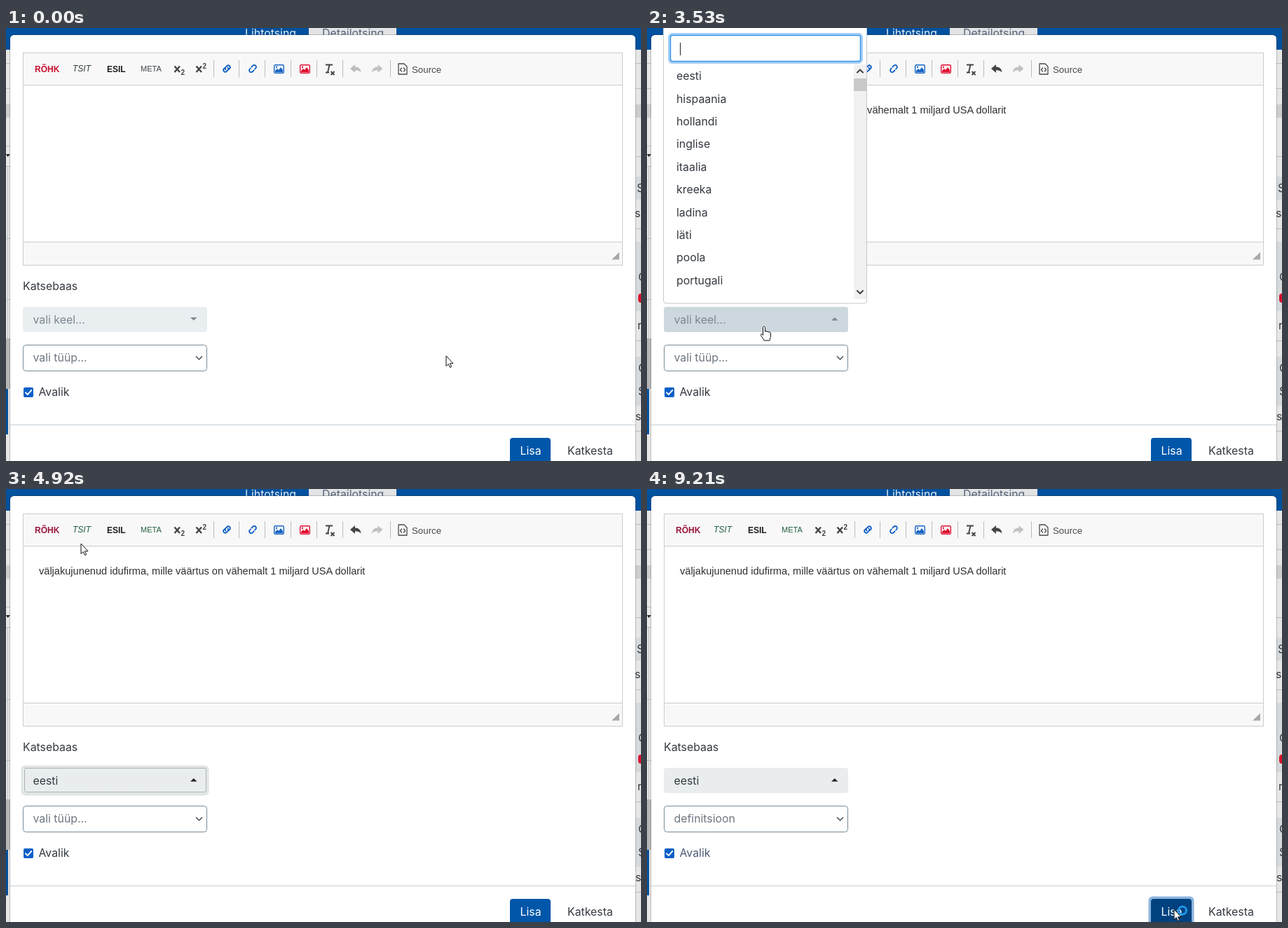
An HTML page that plays this animation: 906x618 px, repeating every 9.28 s.

```html
<!DOCTYPE html>
<html lang="et">
<head>
<meta charset="utf-8">
<title>Definitsiooni lisamine</title>
<style>
  html, body { margin: 0; width: 100%; height: 100%; overflow: hidden; background: #fff; }
  svg { display: block; width: 906px; height: 618px; }
  text { font: 15.85px Inter, sans-serif; fill: #343a41; white-space: pre; }
  .arial text, text.arial { font-family: "Liberation Sans", Arial, sans-serif; }
  .native text { font: 14.6px "Open Sans", "Noto Sans", sans-serif; fill: #5b6070; }
  .tool text { font-size: 12px; }
  .line { fill: none; stroke-linecap: round; stroke-linejoin: round; }
</style>
</head>
<body>
<svg viewBox="0 0 906 618">
  <defs>
    <g id="picture">
      <rect x=".7" y=".7" width="13.6" height="11.6" rx="1.5" fill="#fff" stroke="currentColor" stroke-width="1.4"/>
      <path d="M2 11V9l3-3 2 2 3-4 3 4v3z" fill="currentColor"/>
      <circle cx="4" cy="3.7" r="1.2" fill="currentColor"/>
    </g>
    <path id="back" d="M0 6 7 0v3.5c5 0 8 2.5 8.5 8C13.5 9 11 8.300 7 8.300V12z"/>
    <path id="chain" class="line" stroke="#0b5cc4" stroke-width="1.8"
      d="M-1.5 1.5a2.6 2.6 0 0 1 0-3.600l1.800-1.800a2.6 2.6 0 0 1 3.700 3.700l-1.300 1.300M1.5-1.5a2.6 2.6 0 0 1 0 3.600l-1.800 1.800a2.6 2.6 0 0 1-3.700-3.700l1.300-1.300"/>
    <path id="halfLink" class="line" stroke="#0b5cc4" stroke-width="1.8" d="M-1.5-2.5l1.800-1.800a2.6 2.6 0 0 1 3.900 3.700l-1 1.100"/>
  </defs>

  <!-- dimmed page behind the dialog -->
  <g id="page">
    <rect width="906" height="618" fill="#e6e6e6"/>
    <rect width="906" height="31" fill="#00519e"/>
    <rect x="432" width="125" height="12" fill="#e2e3e5"/>
    <text x="341" y="13" style="fill:#e6eef6">Lihtotsing</text>
    <text x="451" y="13" style="fill:#56657b">Detailotsing</text>
    <rect y="109" width="906" height="19" fill="#cdcdcd"/>
    <path d="M0 50.500H906M0 86.500H906M896 183.500h10M896 286.500h10M896 446.500h10M896 575.500h10M0 168.500h6M0 197.500h6M0 300.500h6M0 387.500h6" stroke="#b9bcc0"/>
    <path d="M896 212h10v33h-10zM896 305h10v33h-10zM896 338h10v66h-10zM896 469h10v70h-10z" fill="#d6d9db"/>
    <path d="M2.500 198V515" stroke="#b9bcc0"/>
    <rect y="443" width="6" height="72" fill="#b5b5b5"/>
    <rect y="515" width="3" height="65" fill="#00519e"/>
    <path d="M0 180h6l-3.500 4z" fill="#222"/>
    <rect x="902" y="379" width="10" height="13" rx="4" fill="#d9132f"/>
    <g id="snippets"></g>
  </g>

  <!-- dialog -->
  <rect x="5.500" y="9.500" width="893" height="640" rx="6" fill="none" stroke="#000" stroke-opacity=".2"/>
  <rect x="6" y="10" width="892" height="640" rx="5.500" fill="#fff"/>
  <path d="M6 566.500H898" stroke="#c5d0d9"/>
  <g stroke="#c9cccf">
    <rect x="24.500" y="35.500" width="855" height="303" fill="#fff"/>
    <path d="M24.500 35.500h855v46h-855zM24.500 305.500h855v33h-855z" fill="#f8f8f8"/>
  </g>
  <path d="M875 320v10.500h-11z" fill="#a8a8a8"/>
  <path d="M296.500 46v24M332.500 46v24M369.500 46v24M406.500 46v24M443.500 46v24M480.500 46v24M548.500 46v24" stroke="#bcbcbc"/>

  <g class="arial tool">
    <text id="rohk" x="41" y="63" style="font-weight:bold">RÕHK</text>
    <text id="tsit" x="95" y="62" style="font-style:italic">TSIT</text>
    <text x="144" y="63" style="font-weight:bold;fill:#1c1c1c">ESIL</text>
    <text id="meta" x="192" y="62" style="font-size:11px">META</text>
    <path d="M240.500 54.500l7.500 8.500M248 54.500l-7.500 8.500M271.500 54.500l7.500 8.500M279 54.500l-7.500 8.500" stroke="#444" stroke-width="2.400"/>
    <text x="249.500" y="67" style="font-size:10px;fill:#444;font-weight:bold">2</text>
    <text x="280.500" y="58" style="font-size:10px;fill:#444;font-weight:bold">2</text>
    <text x="579" y="63.500" style="font-size:13.300px;fill:#484848">Source</text>
  </g>
  <use href="#chain" x="315" y="58"/>
  <use href="#halfLink" x="352" y="58"/>
  <use href="#halfLink" transform="translate(352 58) rotate(180)"/>
  <use href="#picture" x="382" y="52" color="#1763c2"/>
  <use href="#picture" x="419" y="52" color="#df0d2f"/>
  <path d="M456 52.500h10M461.500 52.500l-2.500 11M456 63.500h5M463.500 62l5 5M468.500 62l-5 5" fill="none" stroke="#444" stroke-width="1.900"/>
  <use id="undo" href="#back" x="491" y="52"/>
  <use href="#back" transform="translate(537.500 52) scale(-1 1)" fill="#c2c2c2"/>
  <path class="line" d="M560 51h8l4 4v11h-12zM564.500 57l-2 2.500 2 2.500M567.500 57l2 2.500-2 2.500" stroke="#4a4a4a" stroke-width="1.300"/>

  <text id="definition" class="arial" x="47" y="121.500" style="font-size:14.570px;fill:#2f2f2f">väljakujunenud idufirma, mille väärtus on vähemalt 1 miljard USA dollarit</text>
  <path id="caret" d="M0 108.500v15.500" stroke="#111"/>

  <!-- form -->
  <text x="24" y="373.500">Katsebaas</text>
  <rect id="languageRing" x="21.500" y="394.500" width="268" height="43" rx="6" fill="#e1e4e5"/>
  <rect id="languageBox" x="24" y="398" width="263" height="36" rx="4"/>
  <rect id="languageDots" x="26.500" y="398.500" width="259" height="34" rx="2" fill="none" stroke="#6d7276" stroke-dasharray="1 1"/>
  <text id="languageText" x="38.500" y="421.500"></text>
  <path id="languageArrow"/>

  <rect id="typeRing" x="20.500" y="448.500" width="270" height="45" rx="7" fill="#a8d0f5"/>
  <rect id="typeBox" x="24.500" y="452.500" width="262" height="37" rx="4" fill="#fff"/>
  <text id="typeText" x="38.500" y="476"></text>
  <path class="line" d="M271.500 469l4 4 4-4" stroke="#4d5660" stroke-width="1.700"/>

  <rect x="25" y="513" width="14" height="14" rx="2" fill="#0b60c8"/>
  <path class="line" d="M28 520.300l2.800 2.900 5.500-6.200" stroke="#fff" stroke-width="1.900"/>
  <text id="public" x="46.500" y="524.500">Avalik</text>

  <rect id="addRing" x="715.500" y="581.500" width="65" height="46" rx="6" fill="#8db4dc"/>
  <rect id="addBox" x="719" y="585" width="58" height="40" rx="4"/>
  <text x="748.500" y="609" text-anchor="middle" style="fill:#fff">Lisa</text>
  <text x="801" y="609">Katkesta</text>

  <g id="languageMenu">
    <rect x="23.500" y="-8" width="290" height="401" rx="4" fill="#fff" stroke="#c3cad0"/>
    <rect x="30" y="7" width="278" height="44" rx="6" fill="#a8d0f5"/>
    <rect x="33.500" y="10.500" width="271" height="37" rx="3" fill="#fff" stroke="#3a97ea" stroke-width="1.500"/>
    <path id="searchCaret" d="M47.500 21v18" stroke="#222"/>
    <rect id="languageHover" x="24" width="271" height="32.400" fill="#e9edf1"/>
    <g id="languages"></g>
    <path d="M295 52h18v335h-18z" fill="#f1f1f1"/>
    <path d="M295 72h18v18h-18z" fill="#c9c9c9"/>
    <path class="line" d="M300 63.500l4-4 4 4M300 375l4 4 4-4" stroke="#444" stroke-width="2"/>
  </g>

  <g id="typeMenu" class="native">
    <rect x="23.500" y="489.500" width="262" height="140" fill="#fff" stroke="#8e98a2"/>
    <rect id="typeHover" x="24" width="261" height="31" fill="#dfdfe4"/>
    <g id="types"></g>
  </g>

  <g id="pointer">
    <path id="arrow" d="M0 0v14.500l3.300-3 2.200 5 2.200-1-2.200-4.700h4.500z" fill="#fff" stroke="#111"/>
    <path id="beam" d="M-3.500-7.500h2.500L0-6.500 1-7.500h2.500M0-6.500v13M-3.500 7.500H-1L0 6.500l1 1h2.500" fill="none" stroke="#111" stroke-width="1.200"/>
    <path id="hand" d="M-1.500 1.500c0-2 3-2 3 0v6c.5-1.500 3-1.200 3 .5.500-1.300 2.700-1 2.700.6.500-1 2.300-.6 2.300 1V14c0 2-1.300 3-1.500 6H0c-.5-2.500-3-4-4.500-7.500-.8-2 1-2.500 2-1.200l1 1.300z" fill="#fff" stroke="#111"/>
    <circle id="busy" cx="12" cy="1.500" r="5.500" fill="none" stroke="#2196e8" stroke-width="3"/>
  </g>
</svg>

<script>
const LOOP = 9280;
const $ = id => document.getElementById(id);
const show = (id, visible) => $(id).setAttribute('display', visible ? 'inline' : 'none');
const set = (id, attrs) => { for (const name in attrs) $(id).setAttribute(name, attrs[name]); };
const within = (t, from, to) => t >= from && t < to;

// items: [label, baseline, left]
function addTexts(id, items) {
  $(id).innerHTML = items.map(([label, y, x]) => `<text x="${x}" y="${y}">${label}</text>`).join('');
}
const ROW = 32.4;
addTexts('languages', ['eesti', 'hispaania', 'hollandi', 'inglise', 'itaalia', 'kreeka', 'ladina', 'läti', 'poola', 'portugali']
  .map((label, i) => [label, 74.2 + i * ROW, 42]));
addTexts('types', ['–', 'definitsioon', 'selgitus', 'lühivihje (kakskeelses)']
  .map((label, i) => [label, 515.5 + i * 31, 31]));
addTexts('snippets', [['S', 234, 900], ['su', 270, 897], ['O', 361, 902], ['r', 430, 901], ['O', 491, 902], ['S', 524, 902], ['s', 560, 898]]);

// pointer hot spot: time, x, y
const PATH = [
  [0, 628, 468], [69, 628, 468], [70, 574, 380], [340, 574, 380], [540, 373, 214], [2649, 373, 214],
  [2650, 254, 327], [2920, 167, 426], [3790, 167, 426], [4000, 137, 138], [4240, 122, 108], [4650, 107, 78],
  [5120, 107, 78], [5320, 187, 290], [5520, 156, 487], [5719, 156, 487], [5720, 155, 480],
  [6470, 155, 480], [6680, 148, 522], [6900, 148, 540], [7610, 148, 540], [7880, 741, 457],
  [8140, 741, 457], [8270, 752, 586], [8460, 752, 600], [LOOP, 752, 600]
];
function pointerAt(t) {
  const i = PATH.findIndex(p => p[0] > t);
  const [t0, x0, y0] = PATH[i - 1], [t1, x1, y1] = PATH[i];
  const k = (t - t0) / (t1 - t0);
  return [x0 + (x1 - x0) * k, y0 + (y1 - y0) * k];
}

function pointerShape(t) {
  if (within(t, 410, 2700) || within(t, 5150, 5330)) return 'beam';
  return within(t, 2880, 4920) ? 'hand' : 'arrow';
}

function drawEditor(t) {
  const typed = t >= 1990, chosen = t >= 4920;
  show('definition', typed);
  show('caret', within(t, 1000, 1590) || within(t, 1990, 2720) || within(t, 3180, 3250));
  set('caret', { transform: `translate(${typed ? 512.5 : 47.5} 0)` });
  set('undo', { fill: t >= 2120 ? '#454545' : '#bdbdbd' });
  $('rohk').style.fill = chosen ? '#98173a' : '#c8102e';
  $('tsit').style.fill = chosen ? '#22603f' : '#33423d';
  $('meta').style.fill = chosen ? '#22603f' : '#3b444c';
}

function drawLanguage(t) {
  const open = within(t, 3530, 4920), chosen = t >= 4920;
  const pressed = within(t, 3180, 4920), focused = within(t, 4920, 5940);
  show('languageRing', focused || within(t, 3180, 3530));
  show('languageDots', focused);
  set('languageBox', { fill: pressed ? '#cdd7de' : chosen ? '#e9edee' : '#e9eef1' });
  $('languageText').textContent = chosen ? 'eesti' : 'vali keel...';
  $('languageText').style.fill = chosen ? '#343a41' : '#7d878f';
  set('languageArrow', {
    d: open || chosen ? 'M263 417.500h9.500l-4.750-4.500z' : 'M263 413h9.500l-4.750 4.500z',
    fill: chosen ? '#222' : '#7d878f'
  });
  show('languageMenu', open);
  show('searchCaret', (t - 3530) % 1060 < 530);
  const row = Math.floor((pointerAt(Math.max(0, t - 30))[1] - 52.8) / ROW);
  show('languageHover', open && row >= 0 && row < 10);
  set('languageHover', { y: 52.8 + row * ROW });
}

function drawType(t, y) {
  const focused = within(t, 5870, 8600), open = within(t, 6010, 7220), chosen = t >= 7220;
  show('typeRing', focused);
  set('typeBox', { stroke: focused ? '#3a97ea' : '#768b9a', 'stroke-width': focused ? 1.5 : 1 });
  $('typeText').textContent = chosen ? 'definitsioon' : 'vali tüüp...';
  $('typeText').style.fill = focused ? '#596377' : '#6d7680';
  $('public').style.fill = chosen ? '#4c5a73' : '#343a41';
  show('typeMenu', open);
  set('typeHover', { y: y < 525 ? 494 : 525 });
}

function drawAdd(t) {
  const pressed = t >= 8600;
  show('addRing', pressed);
  set('addBox', { fill: pressed ? '#00427f' : t >= 8270 ? '#0050a0' : '#0056a9' });
}

function draw(t) {
  const [x, y] = pointerAt(t), shape = pointerShape(t);
  drawEditor(t);
  drawLanguage(t);
  drawType(t, y);
  drawAdd(t);
  set('pointer', { transform: `translate(${x} ${y})` });
  for (const id of ['arrow', 'beam', 'hand']) show(id, id === shape);
  show('busy', t >= 9210);
}

const start = performance.now();
function tick() {
  draw((performance.now() - start) % LOOP);
  requestAnimationFrame(tick);
}
tick();
</script>
</body>
</html>
```
